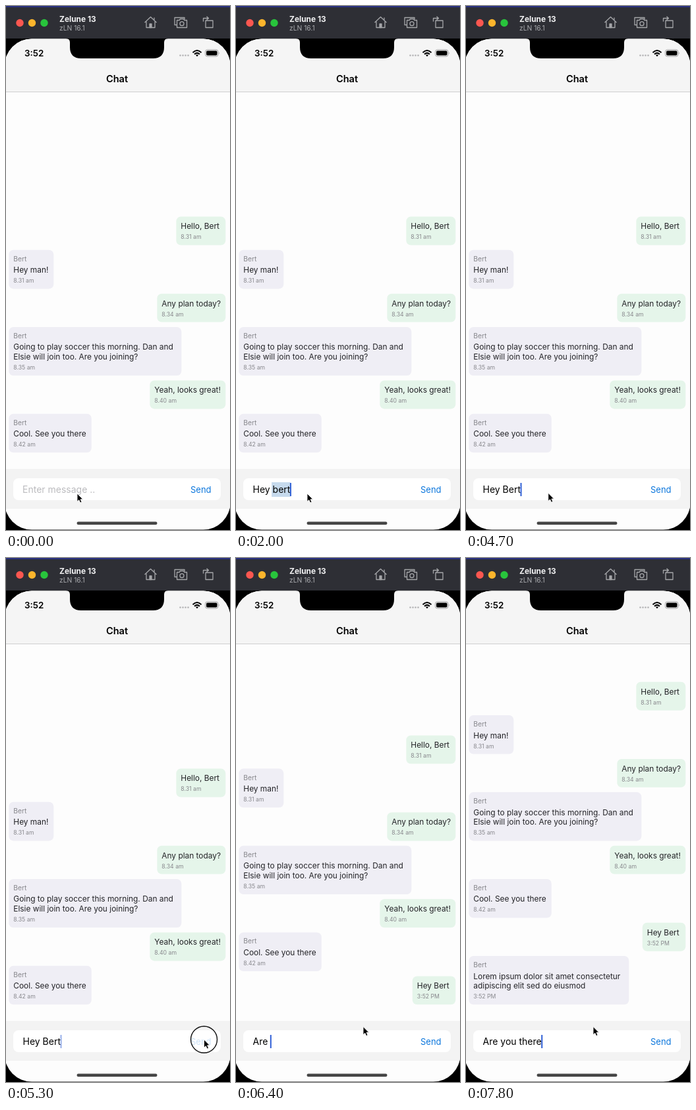
An HTML page that plays this animation: 340x790 px, repeating every 8 s.

```html
<!DOCTYPE html>
<html lang="en">
<head>
<meta charset="utf-8">
<title>Chat</title>
<style>
  html, body { margin: 0; height: 100%; overflow: hidden; background: #000; }
  svg { display: block; width: 100vw; height: 100vh; }
  text { font-family: Inter, Roboto, sans-serif; white-space: pre; }
  .name { font-size: 10.3px; fill: #88888d; }
  .msg { font-size: 11.9px; fill: #242428; }
  .time { font-size: 8.7px; fill: #88888d; }
  .input { font-size: 14px; }
  .icon { fill: none; stroke: #a5a6a9; stroke-width: 1.3; stroke-linejoin: round; }
</style>
</head>
<body>
<svg viewBox="0 0 340 790">
  <rect width="340" height="790" fill="#000"/>

  <!-- window bar -->
  <rect width="340" height="2" fill="#29317f"/>
  <rect y="2" width="340" height="47" fill="#2e2f35"/>
  <circle cx="21" cy="25.5" r="5.7" fill="#fc5750"/>
  <circle cx="39.5" cy="25.5" r="5.7" fill="#fdb52c"/>
  <circle cx="58" cy="25.5" r="5.7" fill="#28c43c"/>
  <text x="81" y="24" font-size="11.9" font-weight="700" fill="#f1f1f2">Zelune 13</text>
  <text x="81" y="37" font-size="10.3" fill="#a9aaae">zLN 16.1</text>
  <g class="icon">
    <path d="M210.500 25L219.500 16.500L228.500 25M213 23.500V32.500H226V23.500M225 21V17.500"/>
    <path d="M218 32.500V27H221V32.500Z" fill="#a5a6a9"/>
    <path d="M259 28.500H256V17.500H271V20"/>
    <path d="M259.500 21.500H263L264.500 19.500H269.500L271 21.500H274.500V32.500H259.500Z"/>
    <circle cx="267" cy="26.700" r="3"/>
    <path d="M303 22H314V32.500H303ZM299.500 23.500V18.500H307M304.500 15.800L307.500 18.500L304.500 21"/>
  </g>

  <!-- phone screen -->
  <clipPath id="screen"><rect x="-2" y="49.500" width="342.500" height="740" rx="41"/></clipPath>
  <g clip-path="url(#screen)">
    <rect x="-2" y="49" width="343" height="741" fill="#fdfdfd"/>
    <rect x="-2" y="49" width="343" height="80" fill="#f5f5f5"/>
    <rect x="-2" y="129" width="343" height="1" fill="#cfcfd0"/>
    <g id="chat"></g>
    <rect x="-2" y="698" width="343" height="60" fill="#f3f3f3"/>
    <rect x="11" y="712" width="315" height="33" rx="8" fill="#fff"/>
    <rect x="107.500" y="777.500" width="122" height="4.500" rx="2.250" fill="#454545"/>
  </g>
  <path d="M91 49Q97 49 97 55V62Q97 79 114 79H223Q240 79 240 62V55Q240 49 246 49Z"/>
  <text x="28" y="76" font-size="13.400" font-weight="600">3:52</text>
  <g fill="#b4b4b6">
    <circle cx="264.500" cy="74.500" r="1.300"/><circle cx="268.500" cy="74.500" r="1.300"/>
    <circle cx="272.500" cy="74.500" r="1.300"/><circle cx="276.500" cy="74.500" r="1.300"/>
  </g>
  <g fill="none" stroke="#000" stroke-width="2">
    <path d="M283.500 70.200Q290 63.800 296.500 70.200M286 72.800Q290 69 294 72.800"/>
    <path d="M288 74L290 76.200L292 74Q290 72.500 288 74Z" fill="#000" stroke="none"/>
  </g>
  <rect x="302.500" y="66" width="19.500" height="10" rx="3" fill="none" stroke="#a0a0a2"/>
  <rect x="304" y="67.500" width="16.500" height="7" rx="1.700"/>
  <path d="M323 69.500Q324.800 71 323 72.500Z" fill="#a0a0a2"/>
  <text x="168.500" y="115" font-size="14.600" font-weight="600" text-anchor="middle">Chat</text>

  <!-- input row -->
  <rect id="mark" y="718" height="22" fill="#c6daed"/>
  <text id="hint" class="input" x="25" y="734" fill="#bcbcbf">Enter message ..</text>
  <text id="typed" class="input" x="25.500" y="734"></text>
  <rect id="caret" y="719" width="2" height="20" fill="#2f5fd6"/>
  <text id="send" x="280" y="733.500" font-size="13" fill="#0b76dc">Send</text>

  <g id="pointer">
    <circle id="ring" r="20" fill="none" stroke="#111" stroke-width="1.400"/>
    <path d="M0 0V12.300L2.800 9.700L4.700 14L7 13L5.100 8.800H8.800Z" stroke="#fff" stroke-width=".9"/>
  </g>
</svg>
<script>
const $ = id => document.getElementById(id);
const LOOP = 8000, STEP = 100, BOTTOM = 673.3, GAP = 7.3;

// Bubble width, sender (empty for own), time, lines
const messages = [
  [75, '', '8.31 am', 'Hello, Bert'],
  [68, 'Bert', '8.31 am', 'Hey man!'],
  [104, '', '8.34 am', 'Any plan today?'],
  [262, 'Bert', '8.35 am', 'Going to play soccer this morning. Dan and', 'Elsie will join too. Are you joining?'],
  [115, '', '8.40 am', 'Yeah, looks great!'],
  [125.5, 'Bert', '8.42 am', 'Cool. See you there'],
  [65.5, '', '3:52 PM', 'Hey Bert'],
  [243, 'Bert', '3:52 PM', 'Lorem ipsum dolor sit amet consectetur', 'adipiscing elit sed do eiusmod']
];

const label = (cls, x, y, s) => `<text class="${cls}" x="${x}" y="${y}">${s}</text>`;
const ends = [];
let nextY = 0;
$('chat').innerHTML = messages.map(([w, name, time, ...lines]) => {
  const y = nextY, h = 28.2 + 14.7 * lines.length + (name ? 15.7 : 0);
  const x = name ? 4.3 : 333.3 - w, tx = x + 7;
  ends.push(y + h);
  nextY += h + GAP;
  return `<g><rect x="${x}" y="${y}" width="${w}" height="${h}" rx="7" fill="${name ? '#efeef5' : '#e5f5ea'}"/>` +
    label('name', tx, y + 17, name) +
    lines.map((s, i) => label('msg', tx, y + (name ? 34.6 : 18.9) + 14.7 * i, s)).join('') +
    label('time', tx, y + h - 9, time) + '</g>';
}).join('');
const bubbles = [...$('chat').children];

const keys = [
  [0, ''], [700, 'H'], [1000, 'He'], [1200, 'Hey'], [1300, 'Hey '],
  [1500, 'Hey b'], [1700, 'Hey be'], [1800, 'Hey ber'], [2000, 'Hey bert'], [3400, 'Hey Bert'],
  [5500, ''], [6000, 'A'], [6100, 'Ar'], [6200, 'Are'], [6400, 'Are '],
  [6700, 'Are y'], [6900, 'Are yo'], [7100, 'Are you '], [7300, 'Are you t'], [7400, 'Are you th'],
  [7600, 'Are you the'], [7700, 'Are you ther'], [7800, 'Are you there']
];

const ease = (t, a, b) => {
  const p = Math.min(1, Math.max(0, (t - a) / (b - a)));
  return p * p * (3 - 2 * p);
};
const mix = (a, b, p) => a + (b - a) * p;
const show = (el, on) => { el.style.display = on ? '' : 'none'; };
const blink = ms => [1, 1, 1, 1, 1, .85, .4, 0, 0, .5][Math.floor(ms % 1000 / 100)];

function draw(now) {
  const t = Math.floor(now % LOOP / STEP) * STEP;

  const count = t < 5500 ? 6 : t < 6500 ? 7 : 8;
  bubbles.forEach((b, i) => show(b, i < count));
  $('chat').setAttribute('transform', `translate(0 ${BOTTOM - ends[count - 1]})`);

  const [since, text] = keys.filter(k => k[0] <= t).pop();
  const typed = $('typed');
  typed.textContent = text;
  const end = 25.5 + (text ? typed.getComputedTextLength() : 0);
  show($('hint'), !text);
  $('caret').setAttribute('x', end - .5);
  $('caret').setAttribute('opacity', t < 700 ? 0 : blink(t - since));

  const marked = since === 2000;
  show($('mark'), marked);
  if (marked) {
    const start = 24 + typed.getSubStringLength(0, 4);
    $('mark').setAttribute('x', start);
    $('mark').setAttribute('width', end - start);
  }

  const go = ease(t, 4600, 5150), back = ease(t, 5500, 5800);
  const x = mix(mix(108, 300.5, go), 193, back), y = mix(mix(735, 726, go), 706.5, back);
  $('pointer').setAttribute('transform', `translate(${x} ${y})`);
  show($('ring'), t >= 5200 && t < 5500);
  $('send').setAttribute('opacity', 1 - .8 * (ease(t, 5100, 5300) - ease(t, 5500, 5800)));

  requestAnimationFrame(() => draw(performance.now() - begin));
}
const begin = performance.now();
draw(0);
</script>
</body>
</html>
```
